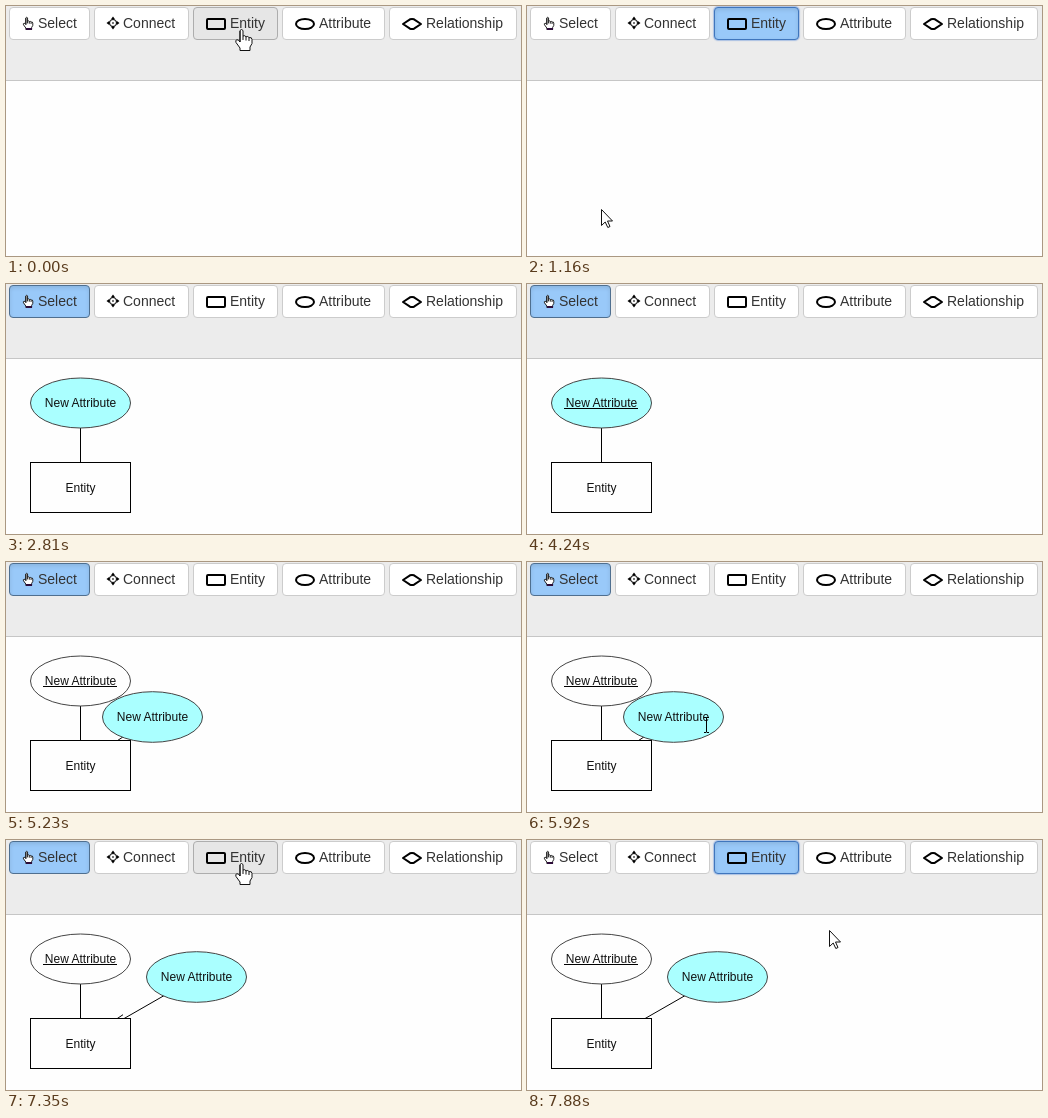
Recreate the animation shown at these times as an HTML page. Size 515 by 250 pixels, loop 8 s.

```html
<!DOCTYPE html>
<html lang="en">
<head>
<meta charset="utf-8">
<title>Diagram editor</title>
<style>
html, body { margin: 0; width: 100%; height: 100%; overflow: hidden; background: #fefefe; }
#bar { position: absolute; left: 0; top: 0; width: 515px; height: 74px; background: #ececec; border-bottom: 1px solid #c6c6c6; }
.btn { position: absolute; top: 1px; height: 33px; box-sizing: border-box; border: 1px solid #ccc; border-radius: 4px; background: #fff; }
.btn.hover { background: #e6e6e6; border-color: #adadad; }
.btn.on { background: #99c9f9; border-color: #4f6f8f; box-shadow: inset 0 2px 4px rgba(0,0,0,.1); }
.btn.focus { border-color: #3f76bd; box-shadow: inset 0 2px 4px rgba(0,0,0,.1), 0 0 1px 1px rgba(90,140,215,.45); }
svg { position: absolute; left: 0; top: 0; width: 515px; height: 250px; }
text { font: 12px "Liberation Sans", Arial, sans-serif; fill: #111; text-anchor: middle; }
.label { font-size: 14px; fill: #333; text-anchor: start; }
.line { fill: none; stroke: #000; stroke-width: 1; }
.bold { fill: none; stroke: #000; stroke-width: 2; stroke-linejoin: round; }
.oval { stroke: #444; fill: #fefefe; }
.oval.sel { fill: #aff; }
.pointer { fill: #fff; stroke: #111; stroke-width: 1; stroke-linejoin: round; }
</style>
</head>
<body>
<div id="bar"></div>
<svg viewBox="0 0 515 250">
  <defs>
    <g id="hand">
      <path d="M-1.5 1.5Q0-.5 1.5 1.5V7Q3.5 6 4.5 7.8Q6.5 6.8 7.5 8.6Q10.5 8 10.5 10.5V14.5L8.5 18V21.5H-1.5V19L-5.5 13.5Q-6.5 11-4.5 10.7Q-3 10.7-1.5 13Z"/>
      <path d="M1.5 7V11M4.5 8V11.5M7.5 9V12M-1.5 2V13" fill="none"/>
    </g>
  </defs>

  <g id="labels"></g>
  <g transform="translate(20.7 11) scale(.58)" class="pointer" style="stroke-width:1.6"><use href="#hand"/></g>
  <path d="M20 22h6v2h-6z" fill="#2c0c38"/>
  <circle class="line" cx="107" cy="17" r="3.5"/>
  <path d="M107 10.5l2.2 3h-4.4zM107 23.5l2.2-3h-4.4zM100.5 17l3-2.2v4.4zM113.5 17l-3-2.2v4.4zM106.3 16.3h1.4v1.4h-1.4z"/>
  <rect class="bold" x="201" y="13" width="18" height="10" rx="1"/>
  <ellipse class="bold" cx="299" cy="18" rx="9" ry="5"/>
  <path class="bold" d="M397 18L404 13.3Q406 12.5 408 13.3L415 18L408 22.7Q406 23.5 404 22.7Z"/>

  <path id="link1" class="line" d="M74.5 119V203"/>
  <path id="link2" class="line"/>
  <path id="trace" class="line" d="M111 178.7L117 174.7"/>
  <g id="entity">
    <rect class="line" x="24.5" y="178.5" width="100" height="50" style="fill:#fefefe"/>
    <text x="74.5" y="208">Entity</text>
  </g>
  <g id="attr1" transform="translate(74.5 119)">
    <ellipse class="oval" rx="50" ry="25"/>
    <text y="4">New Attribute</text>
    <path id="under" d="M-37.5 5h74v1h-74z"/>
  </g>
  <g id="attr2">
    <ellipse class="oval sel" rx="50" ry="25.3"/>
    <text y="4">New Attribute</text>
  </g>

  <g id="cursor">
    <path id="arrow" class="pointer" d="M.5.5V16.5L4.2 13L6.8 18.5L9 17.5L6.5 12H11.5Z"/>
    <g id="finger" class="pointer" transform="translate(.5 0)"><use href="#hand"/></g>
    <path id="beam" class="line" d="M-3-7.5H-1L-.5-7L0-7.5H2M-3 7.5H-1L-.5 7L0 7.5H2M-.5-7V7"/>
  </g>
</svg>
<script>
const LOOP = 8000;
const $ = id => document.getElementById(id);
const buttons = [
  ['Select', 3, 81, 32], ['Connect', 88, 95, 117], ['Entity', 187, 85, 224],
  ['Attribute', 276, 103, 313], ['Relationship', 383, 128, 420]
].map(([name, x, w, tx]) => {
  const el = document.createElement('div');
  el.className = 'btn';
  el.style.left = x + 'px';
  el.style.width = w + 'px';
  $('bar').append(el);
  const label = document.createElementNS('http://www.w3.org/2000/svg', 'text');
  label.setAttribute('class', 'label');
  label.setAttribute('x', tx);
  label.setAttribute('y', 22);
  label.textContent = name;
  $('labels').append(label);
  return { el, name, x, w };
});

const HOME = [146.5, 155], DROP = [190.5, 137], BUTTON = [235, 23];
const smooth = p => p * p * (3 - 2 * p);
const easeOut = p => 1 - (1 - p) ** 2;
const linear = p => p;
const mix = (a, b, p) => a.map((v, i) => v + (b[i] - v) * p);

// Each move runs in equal hard steps; first is the progress on the opening step.
const moves = [
  { at: 0, end: 0, a: BUTTON, b: BUTTON },
  { at: 140, end: 1160, steps: 8, a: BUTTON, b: [74, 203], ease: smooth },
  { at: 1860, end: 2000, steps: 2, first: .5, a: [74, 203], b: [267, 208] },
  { at: 2130 },
  { at: 5370, end: 5920, steps: 5, a: [308, 188], b: [180, 163], ease: easeOut },
  { at: 6070, end: 6220, steps: 2, first: .5, a: [180, 163], b: [188, 161] },
  { at: 6340, end: 6620, steps: 3, first: 1 / 3, a: [188, 161], b: [232, 143] },
  { at: 6770, end: 7350, steps: 5, first: .2, a: [232, 143], via: [360, 85], b: BUTTON },
  { at: 7490, end: 7880, steps: 4, a: BUTTON, b: [302, 90], ease: smooth }
];

function progress(m, t) {
  if (!m.steps) return 1;
  const n = m.steps - 1, first = m.first || 0;
  const k = Math.min(n, Math.floor((t - m.at) / (m.end - m.at) * n + 1e-6));
  return (m.ease || linear)(first + (1 - first) * k / n);
}

function pointer(t) {
  const m = moves.findLast(m => t >= m.at);
  if (!m.a) return null;
  const p = progress(m, t);
  return m.via ? mix(mix(m.a, m.via, p), mix(m.via, m.b, p), p) : mix(m.a, m.b, p);
}

const show = (id, on) => { $(id).style.display = on ? '' : 'none'; };
const move = (id, [x, y]) => $(id).setAttribute('transform', `translate(${x} ${y})`);

function draw(t) {
  const pos = pointer(t);
  const drag = moves[6];
  const attr = mix(HOME, DROP, t < drag.at ? 0 : progress(drag, t));
  const active = t < 140 ? '' : t < 1560 || t >= 7490 ? 'Entity' : 'Select';

  let over = false;
  for (const b of buttons) {
    const inside = pos && pos[1] < 34 && pos[0] >= b.x && pos[0] < b.x + b.w;
    const on = b.name === active;
    over = over || inside;
    b.el.classList.toggle('on', on);
    b.el.classList.toggle('focus', on && active === 'Entity');
    b.el.classList.toggle('hover', inside && !on);
  }

  const second = t >= 5230;
  show('entity', t >= 1560);
  show('attr1', t >= 2810);
  show('link1', t >= 2810);
  show('under', t >= 4240);
  $('attr1').firstElementChild.classList.toggle('sel', !second);
  show('attr2', second);
  show('link2', second);
  show('trace', t >= 6340 && t < 7490);
  move('attr2', attr);
  $('link2').setAttribute('d', `M74.5 203.5L${attr}`);

  show('cursor', pos);
  if (!pos) return;
  const onText = second && Math.abs(pos[0] - attr[0]) < 37 && Math.abs(pos[1] - attr[1]) < 9;
  show('finger', over);
  show('beam', !over && onText);
  show('arrow', !over && !onText);
  move('cursor', pos.map(Math.round));
}

const start = performance.now();
function tick() {
  draw((performance.now() - start) % LOOP);
  requestAnimationFrame(tick);
}
tick();
</script>
</body>
</html>
```
